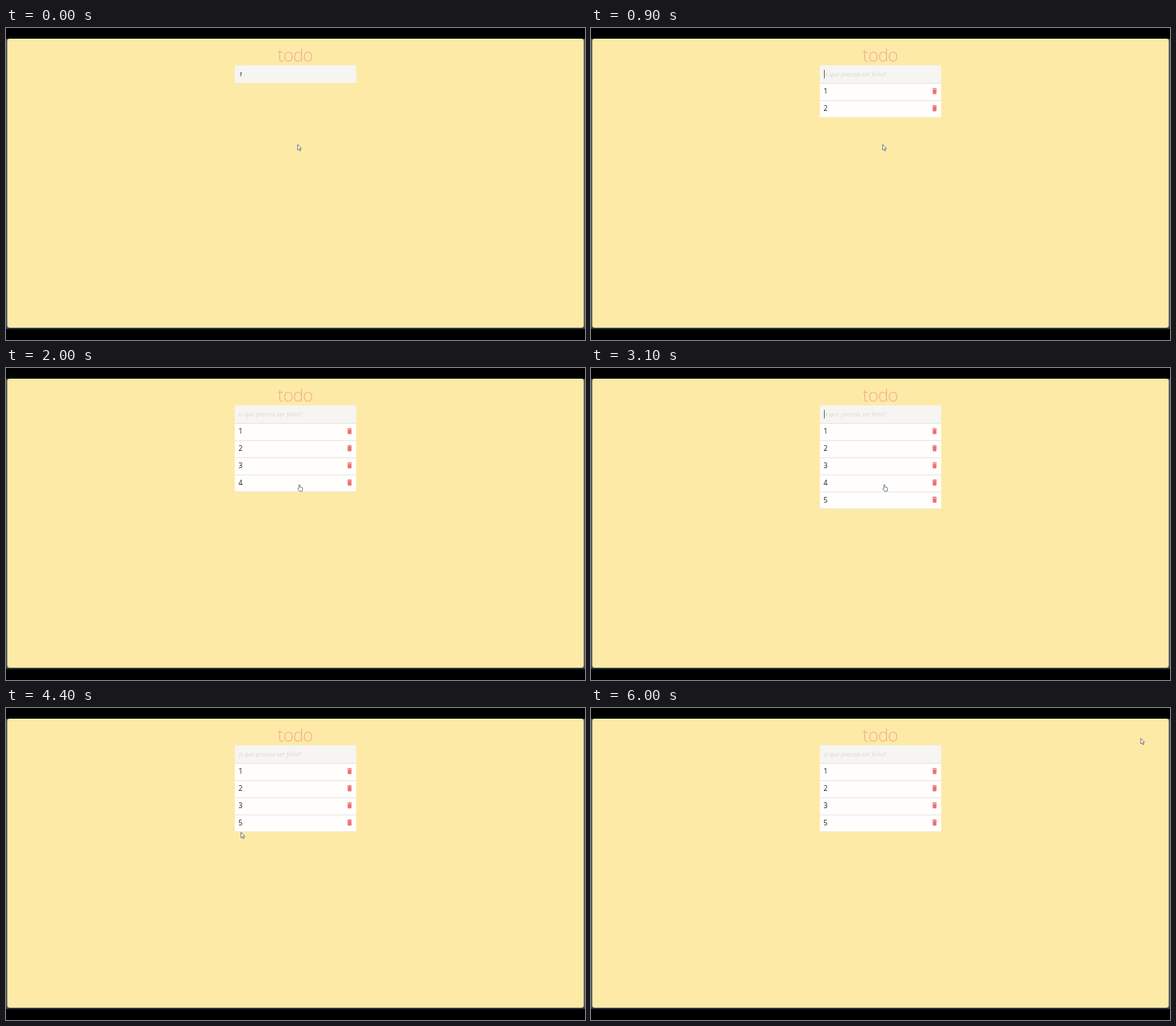
Write an HTML page that moves like this. It is 706 px wide and 380 px high and loops after 6.1 s.

```html
<!DOCTYPE html>
<html lang="pt">
<meta charset="utf-8">
<title>todo</title>
<style>
  html, body { margin: 0; width: 100%; height: 100%; overflow: hidden; background: #000; }
  svg { display: block; }
  text { font: 8.6px "Open Sans", sans-serif; fill: #1c1c1c; }
  #title { font: 300 21.5px "Open Sans", sans-serif; letter-spacing: -.6px; fill: #f3ad93; text-anchor: middle; }
  #entry { font-size: 7.9px; font-style: italic; }
  #entry.hint { font-weight: 300; fill: #c9c9c4; }
  #card { filter: drop-shadow(0 .6px .6px #0003); }
  #cursor { fill: #fff; stroke: #555768; stroke-width: .7; stroke-linejoin: round; }
</style>
<svg width="706" height="380" viewBox="0 0 706 380">
  <path d="M0 13H706V366.5H0Z" fill="#3d4a54"/>
  <rect x="1.5" y="13" width="703" height="352" rx="3" fill="#fdeaa7"/>
  <text id="title" x="352.7" y="40.5">todo</text>
  <rect id="card" x="279" y="45.5" width="148" fill="#fffefc"/>
  <rect x="279" y="45.5" width="148" height="21.5" fill="#f6f5f1"/>
  <text id="entry" x="284" y="59.3"></text>
  <rect id="caret" y="51" width=".8" height="10.5" fill="#555"/>
  <g id="rows"></g>
  <g id="cursor">
    <path id="arrow" d="M.3 .3V7.2L1.9 5.8L3 8.2L4.1 7.7L3 5.4H5Z"/>
    <path id="hand" d="M1.8 5.3V.9Q2.4 0 3 .9V3.4L5.8 4.1Q6.6 4.4 6.4 5.4L5.8 8.6H2.6L.4 5.7Q.6 4.6 1.8 5.3Z"/>
  </g>
</svg>
<script>
  const LOOP = 6100, TICK = 100, TOP = 67.3, ROW = 20.9;
  const HINT = "o que precisa ser feito?";
  const $ = id => document.getElementById(id);

  // The entry shows a label from typed to sent; its row follows at once unless listed is set.
  const items = [
    { label: "1", typed: 0, sent: 400 },
    { label: "2", typed: 800, sent: 900 },
    { label: "3", typed: 1100, sent: 1300 },
    { label: "4", typed: 1400, sent: 2000, removed: 4400 },
    { label: "5", typed: 2100, sent: 2200, listed: 2400 },
  ];
  const focus = { from: 600, to: 4000, blink: 400 };
  const start = { x: 355.3, y: 141.5 };
  const moves = [
    { from: 3600, to: 3800, x: 424, y: 147 },
    { from: 4300, to: 4400, x: 286.3, y: 151 },
    { from: 4500, to: 4700, x: 299, y: 175 },
    { from: 4900, to: 5300, x: 454, y: 197 },
    { from: 5600, to: 5800, x: 670, y: 52 },
    { from: 5900, to: 6000, x: 670, y: 36.5 },
  ];

  const pointerAt = t => moves.reduce((p, m) => {
    const k = Math.min(1, Math.max(0, (t - m.from) / (m.to - m.from)));
    return { x: p.x + (m.x - p.x) * k, y: p.y + (m.y - p.y) * k };
  }, start);

  const caretAt = t => t >= focus.from && t < focus.to &&
    (t - focus.from) % (2 * focus.blink) < focus.blink;

  const rowMarkup = ({ label }, i) => `<g transform="translate(279 ${TOP + i * ROW})">
    <path d="M0 .2H148" stroke="#dfe2db" stroke-width=".8"/>
    <text x="4.6" y="12.9">${label}</text>
    <path d="M137.2 6.2h1.5l.5-.6h1.5l.5 .6h1.5v1h-5.5zM137.6 7.6h4.7v4.9q0 .7-.7 .7h-3.3q-.7 0-.7-.7z" fill="#ed7272"/>
  </g>`;

  const show = (id, visible) => $(id).setAttribute("display", visible ? "inline" : "none");

  function draw(now) {
    const t = Math.floor(now % LOOP / TICK) * TICK;
    const rows = items.filter(({ sent, listed = sent, removed = LOOP }) => t >= listed && t < removed);
    const typing = items.find(({ typed, sent }) => t >= typed && t < sent);
    const { x, y } = pointerAt(t);
    const bottom = TOP + rows.length * ROW;
    const hovering = x > 279 && x < 427 && y > TOP && y < bottom;

    $("rows").innerHTML = rows.map(rowMarkup).join("");
    $("card").setAttribute("height", bottom - 45.8);
    $("entry").textContent = typing ? typing.label : HINT;
    $("entry").setAttribute("class", typing ? "" : "hint");
    $("caret").setAttribute("x", typing ? 288.2 : 284.1);
    $("cursor").setAttribute("transform", `translate(${x} ${y})`);
    show("caret", caretAt(t));
    show("hand", hovering);
    show("arrow", !hovering);
    requestAnimationFrame(draw);
  }
  draw(performance.now());
</script>
</html>
```
